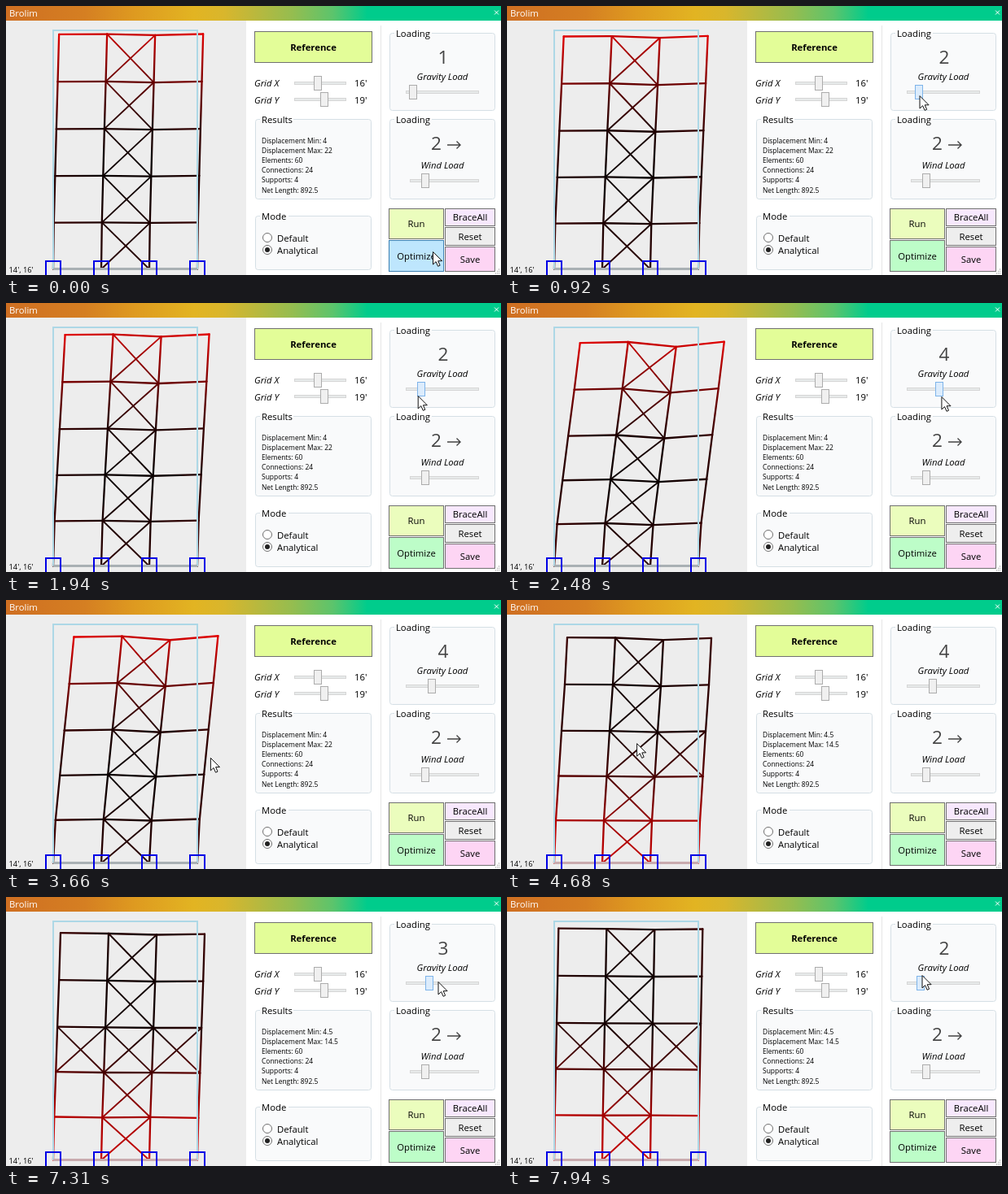
Recreate the animation shown at these times as an HTML page with a canvas. Size 608 px wide and 331 px high, loop 7.99 s.

```html
<!DOCTYPE html>
<html lang="en">
<head>
<meta charset="utf-8">
<title>Brolim</title>
<style>
html, body { margin: 0; width: 100%; height: 100%; overflow: hidden; background: #fff; }
canvas, svg { position: absolute; left: 0; top: 0; width: 608px; height: 331px; }
text { font: 11.3px "Open Sans", "Noto Sans", sans-serif; fill: #000; }
.mid { text-anchor: middle; }
.it { font-style: italic; }
.bold { font-weight: 700; }
.small { font-size: 8.45px; }
.big { font-size: 22.6px; fill: #444; }
</style>
</head>
<body>
<canvas id="view" width="608" height="331"></canvas>
<svg id="ui" viewBox="0 0 608 331"></svg>
<script>
const LOOP = 7990;
const ui = document.getElementById('ui');
const ctx = document.getElementById('view').getContext('2d');

// ---- static interface ----
const rect = (x, y, w, h, fill, stroke = 'none', more = '') =>
  `<rect x="${x}" y="${y}" width="${w}" height="${h}" fill="${fill}" stroke="${stroke}" ${more}/>`;
const text = (x, y, s, cls = '', more = '') =>
  `<text x="${x}" y="${y}" class="${cls}" ${more}>${s}</text>`;
const button = (x, y, w, h, fill, label, id = '', cls = '') =>
  rect(x + .5, y + .5, w, h, fill, '#707070', id && `id="${id}"`) +
  text(x + w / 2 + .5, y + h / 2 + 4.8, label, 'mid ' + cls);
const group = (x, y, w, h, label, labelW) =>
  rect(x + .5, y + .5, w, h, '#f9fafb', '#d5dfe5', 'rx="3"') +
  rect(x + 6, y - 1, labelW + 4, 3, '#fff') + text(x + 8, y + 4.5, label);
const track = (x, y, w) => rect(x + .5, y - 1.5, w, 3, '#e7eaea', '#d6d6d6');
const thumb = (x, y, id = '') =>
  rect(x - 4.5, y - 8.5, 9, 17, '#f0f0f0', '#acacac', id && `id="${id}"`);
const radio = (y, label, on) =>
  `<circle cx="321" cy="${y}" r="5.5" fill="#fff" stroke="#707070"/>` +
  (on ? `<circle cx="321" cy="${y}" r="3" fill="#212121"/>` : '') +
  text(333, y + 5, label);

const stats = ['Displacement Min: 4', 'Displacement Max: 22', 'Elements: 60',
  'Connections: 24', 'Supports: 4', 'Net Length: 892.5'];
const hues = [[0, '#cf6f22'], [.16, '#d57f22'], [.26, '#de9a20'], [.38, '#e2b422'],
  [.44, '#d9b62c'], [.5, '#bcb83c'], [.58, '#94bd50'], [.66, '#5cc46c'], [.73, '#00cc8c'], [1, '#00cc8c']];

ui.innerHTML =
  `<defs><linearGradient id="bar">${hues.map(([o, c]) =>
    `<stop offset="${o}" stop-color="${c}"/>`).join('')}</linearGradient></defs>` +
  rect(295, 18, 313, 313, '#fff') + rect(0, 0, 608, 18, 'url(#bar)') +
  text(4, 13, 'Brolim', '', 'style="fill:#fff"') +
  '<path d="M600 5.5l5 5m0-5l-5 5" stroke="#fff"/>' +
  rect(460, 24, 1, 307, '#e6e6e6') +
  text(3.5, 327.5, "14', 16'", '', 'style="font-size:9.3px"') +
  button(305, 31, 144, 38, '#e3fd98', 'Reference', '', 'bold') +
  text(305, 99, 'Grid X', 'it') + track(354, 95, 63) + thumb(383, 95) + text(428, 99, "16'") +
  text(305, 120, 'Grid Y', 'it') + track(354, 115, 63) + thumb(391, 115) + text(428, 119.5, "19'") +
  group(306, 139, 142, 98, 'Results', 37) +
  stats.map((s, i) => text(314, 169 + i * 12.1, s, 'small', `id="stat${i}"`)).join('') +
  group(306, 258, 142, 66, 'Mode', 31) +
  radio(285, 'Default') + radio(300, 'Analytical', true) +
  group(471, 33, 129, 95, 'Loading', 42) +
  text(537, 71, '1', 'mid big', 'id="load"') + text(536, 90.5, 'Gravity Load', 'mid it') +
  track(491, 106, 89) + thumb(0, 106, 'grip') +
  group(471, 139, 129, 98, 'Loading', 42) +
  text(528.5, 177, '2', 'mid big') +
  '<path d="M542 171h16m-4.5-4.5l4.5 4.5l-4.5 4.5" fill="none" stroke="#444" stroke-width="1.4"/>' +
  text(536, 200, 'Wind Load', 'mid it') + track(496, 215, 84) + thumb(515, 215) +
  button(470, 249, 67, 37, '#ebfdbd', 'Run', 'run') +
  button(470, 288, 67, 38, '#bdfdc8', 'Optimize', 'opt') +
  button(539, 249, 61, 21, '#f7e8fd', 'BraceAll') +
  button(539, 272, 61, 22, '#eee', 'Reset') +
  button(539, 296, 61, 30, '#fdd5f4', 'Save') +
  '<path d="M605 324h1m-3 2.5h1m1 0h1m-5 2.5h1m1 0h1m1 0h1" stroke="#aaa" stroke-width="1.5"/>' +
  '<path id="cursor" d="M-.5 -.5V15l3.6-3.4 2.5 5.7 2.5-1.1-2.4-5.5h4.9z" fill="#fff" stroke="#111" stroke-linejoin="round"/>';

const $ = id => document.getElementById(id);

// ---- motion ----
const slide = [[0, 500], [450, 500], [680, 512], [980, 505], [1380, 525], [1560, 531],
  [1720, 528], [2050, 503], [2480, 531], [2560, 532], [2920, 511], [3120, 529], [3240, 523],
  [6900, 523], [7170, 507], [7490, 538], [7940, 508]];
const pointer = [[0, 525, 303], [70, 525, 303], [250, 522, 200], [430, 503, 108], [1380, 528, 114],
  [2480, 533, 116], [3240, 526, 118], [3410, 425, 165], [3660, 252, 195], [3880, 227, 172],
  [4050, 226, 172], [4210, 226, 172], [4500, 190, 178], [4930, 119, 176], [5010, 107, 176],
  [5260, 106, 176], [5420, 106, 176], [5730, 239, 144], [6210, 479, 112], [6400, 505, 108],
  [6750, 526, 108], [7310, 531, 105], [7940, 512, 97]];

function sample(keys, t, col = 1, ease = u => u) {
  const i = keys.findIndex(k => k[0] > t);
  if (i < 0) return keys[keys.length - 1][col];
  const a = keys[i - 1], b = keys[i];
  return a[col] + (b[col] - a[col]) * ease((t - a[0]) / (b[0] - a[0]));
}
const smooth = u => u * u * (3 - 2 * u);
const slider = t => sample(slide, t, 1, smooth);

// ---- frame model: sway, sag and redness by storey; sag offset by column ----
const plain = { span: 34, dx: [0, 3, 8.7, 14.6, 21, 27], dy: [0, 6, 10, 13.4, 14.7, 15.7],
  off: [0, -1, 4, -1.3], red: [45, 28, 10, 28, 100, 200], base: '#a9b0b4', sides: [] };
const oneSide = { span: 32, dx: [0, 2, 5.5, 9, 13, 16], dy: [0, 6, 10, 13, 14.5, 15.5],
  off: [0, .3, 3, .6], red: [200, 155, 70, 20, 20, 35], base: '#c9abae', sides: [2] };
const twoSides = { span: 32, dx: [0, 1.4, 3.6, 5.7, 8, 10], dy: [0, 6, 9.7, 13, 14.3, 15],
  off: [0, .9, 2.6, 1.6], red: [200, 165, 70, 20, 16, 32], base: '#c9abae', sides: [0, 2] };

function drawFrame(m, s) {
  const k = (s - 491) / m.span;
  const node = (c, r) => ({
    x: 58 + 59 * c + k * m.dx[r],
    y: 323.7 - 58.6 * r + (r ? k * (m.dy[r] + m.off[c] * (c === 2 ? r / 5 : 1)) : 0),
    red: m.red[r] + (c % 3 ? 0 : 25)
  });
  const bar = (c1, r1, c2, r2, w = 2.3) => {
    const a = node(c1, r1), b = node(c2, r2);
    const g = ctx.createLinearGradient(a.x, a.y, b.x, b.y);
    g.addColorStop(0, `rgb(${a.red},0,0)`);
    g.addColorStop(1, `rgb(${b.red},0,0)`);
    ctx.strokeStyle = g;
    ctx.lineWidth = w;
    ctx.beginPath();
    ctx.moveTo(a.x, a.y);
    ctx.lineTo(b.x, b.y);
    ctx.stroke();
  };
  const brace = (c, r) => {
    bar(c, r, c + 1, r + 1, 1.9);
    bar(c + 1, r, c, r + 1, 1.9);
  };

  ctx.fillStyle = '#ededed';
  ctx.fillRect(0, 18, 295, 313);
  ctx.lineCap = 'round';
  for (let r = 0; r < 5; r++) {
    brace(1, r);
    for (let c = 0; c < 4; c++) {
      bar(c, r, c, r + 1);
      if (c < 3) bar(c, r + 1, c + 1, r + 1);
    }
  }
  m.sides.forEach(c => brace(c, 2));

  ctx.lineWidth = 2;
  ctx.strokeStyle = '#add8e6';
  ctx.strokeRect(58, 30, 177, 293);
  ctx.lineCap = 'butt';
  ctx.lineWidth = 3;
  ctx.strokeStyle = m.base;
  ctx.beginPath();
  ctx.moveTo(58, 323.5);
  ctx.lineTo(235, 323.5);
  ctx.stroke();
  ctx.lineWidth = 2;
  ctx.strokeStyle = '#0000e6';
  for (let c = 0; c < 4; c++) ctx.strokeRect(49 + 59 * c, 314, 18, 18);
}

function paint(id, fill, stroke) {
  $(id).setAttribute('fill', fill);
  $(id).setAttribute('stroke', stroke);
}

function render(t) {
  const s = slider(t);
  const drag = (t > 450 && t < 3240) || t > 6860;
  const x = drag ? slider(t + 65) + 2.5 : sample(pointer, t);
  const y = sample(pointer, t, 2);
  const over = (l, top, w, h) => x >= l && x <= l + w && y >= top && y <= top + h;
  const hover = (id, hit, fill, line = '#707070') =>
    hit ? paint(id, '#bee6fd', '#3c7fb1') : paint(id, fill, line);

  drawFrame(t < 4210 ? plain : t < 5420 ? oneSide : twoSides, s);
  hover('run', over(470, 249, 67, 37), '#ebfdbd');
  hover('opt', over(470, 288, 67, 38), '#bdfdc8');
  if (drag || over(s - 5, 97, 10, 18)) paint('grip', '#dcecfc', '#7eb4ea');
  else paint('grip', '#f0f0f0', '#acacac');
  $('grip').setAttribute('x', Math.round(s + .4) - 4.5);
  $('load').textContent = Math.round((s - 491) / 9);
  $('stat0').textContent = 'Displacement Min: ' + (t < 4210 ? '4' : '4.5');
  $('stat1').textContent = 'Displacement Max: ' + (t < 4210 ? '22' : '14.5');
  $('cursor').setAttribute('transform', `translate(${x} ${y})`);
}

const start = performance.now();
function tick() {
  render((performance.now() - start) % LOOP);
  requestAnimationFrame(tick);
}
tick();
</script>
</body>
</html>
```
